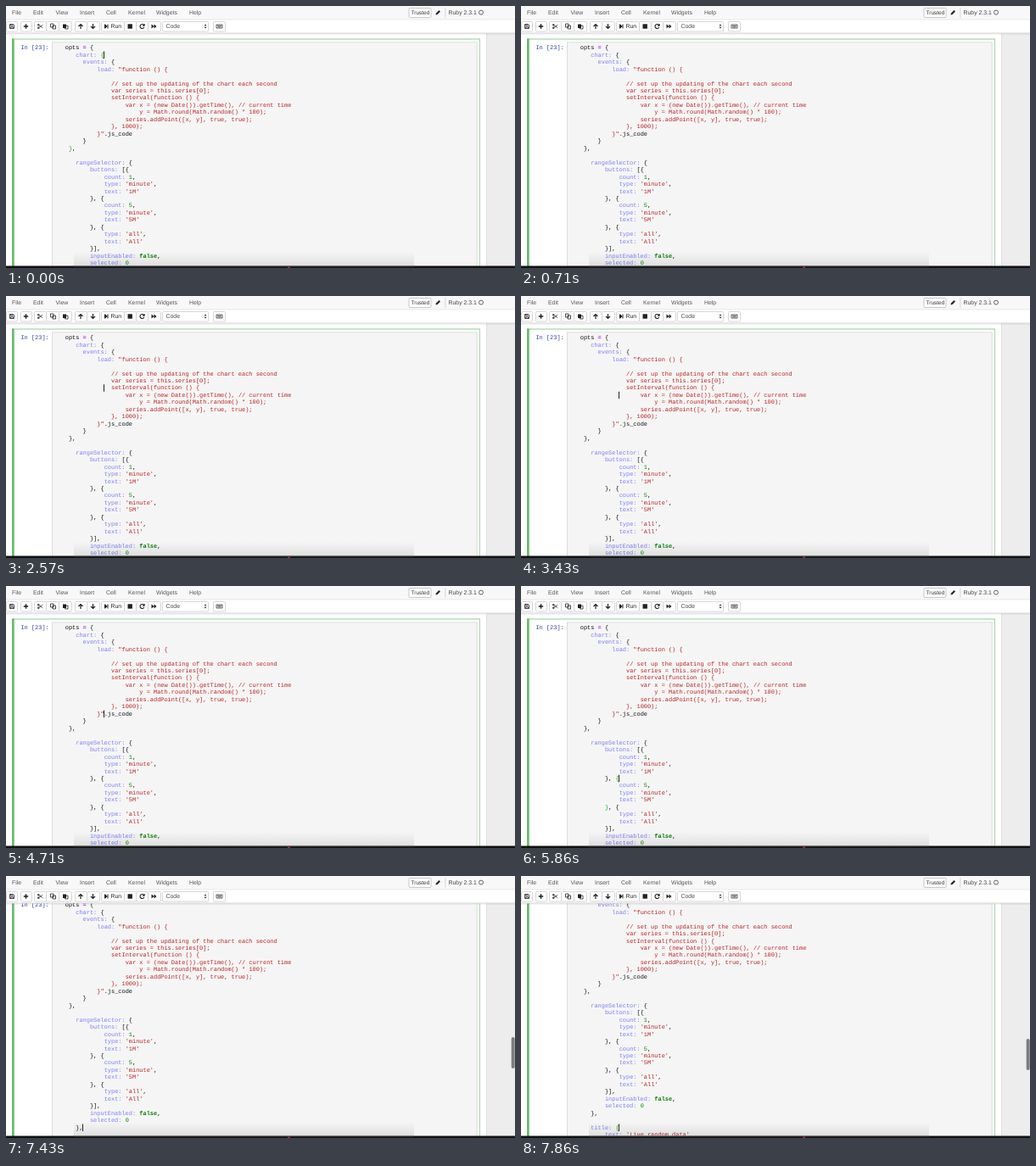
Animation of 600 by 309 pixels, one loop 8 s. Source, as an HTML page with a canvas:

```html
<!DOCTYPE html>
<html lang="en">
<head>
<meta charset="utf-8">
<title>Notebook cell</title>
<style>
html, body { margin: 0; width: 100%; height: 100%; overflow: hidden; background: #fff; }
canvas { display: block; width: 600px; height: 309px; }
</style>
</head>
<body>
<canvas id="stage" width="600" height="309"></canvas>
<script>
const ctx = document.getElementById('stage').getContext('2d');
ctx.textRendering = 'geometricPrecision';

const LOOP = 8000;
const MONO = '6.95px "Liberation Mono", monospace';
const MONO_BOLD = 'bold ' + MONO;
const SANS = '6.9px "Liberation Sans", Arial, sans-serif';
const LEFT = 65.6, TOP = 49, CHAR = 4.17, LINE = 8.467;
const GOAL_COLUMN = 12;

const code = ` opts = {
    chart: {
      events: {
          load: "function () {

              // set up the updating of the chart each second
              var series = this.series[0];
              setInterval(function () {
                  var x = (new Date()).getTime(), // current time
                      y = Math.round(Math.random() * 100);
                  series.addPoint([x, y], true, true);
              }, 1000);
          }".js_code
      }
  },

    rangeSelector: {
        buttons: [{
            count: 1,
            type: 'minute',
            text: '1M'
        }, {
            count: 5,
            type: 'minute',
            text: '5M'
        }, {
            type: 'all',
            text: 'All'
        }],
        inputEnabled: false,
        selected: 0
    },

    title: {
        text: 'Live random data'
    },`;
const lines = code.split('\n');

// Matching bracket cells [row, column], keyed by cursor row
const bracketPairs = {
  1: [[1, 11], [14, 2]],
  13: [[13, 6], [2, 14]],
  21: [[21, 11], [25, 8]],
  25: [[25, 11], [28, 8]],
  33: [[33, 11], [35, 4]]
};

// Cursor moves as [time, row]; a held key covers rows 12 to 29
const moves = [[0, 1], [140, 2], [1000, 3], [1290, 4], [1430, 5], [2290, 6], [2430, 7],
  [3290, 8], [3500, 9], [3750, 10], [4430, 11]];
for (let row = 12; row < 30; row++) moves.push([4710 + (row - 12) * 126, row]);
moves.push([7140, 30], [7430, 31], [7570, 32], [7710, 33]);

const columnX = column => LEFT + column * CHAR;
const rowY = row => TOP + row * LINE;

function rect(x, y, w, h, color) {
  ctx.fillStyle = color;
  ctx.fillRect(x, y, w, h);
}

function text(string, x, y, color, font) {
  ctx.font = font;
  ctx.fillStyle = color;
  ctx.textBaseline = 'alphabetic';
  ctx.fillText(string, x, y + 2.2);
}

function box(x, y, w, h, fill, stroke, radius = 1) {
  ctx.beginPath();
  ctx.roundRect(x + .5, y + .5, w - 1, h - 1, radius);
  ctx.fillStyle = fill;
  ctx.fill();
  ctx.strokeStyle = stroke;
  ctx.lineWidth = .8;
  ctx.stroke();
}

function path(d, x, y, fill, width = 1) {
  ctx.save();
  ctx.translate(x, y);
  const shape = new Path2D(d);
  ctx.lineWidth = width;
  ctx.fillStyle = ctx.strokeStyle = '#222';
  if (fill) ctx.fill(shape); else ctx.stroke(shape);
  ctx.restore();
}

function tokenStyle(token) {
  if (/^["']/.test(token)) return ['#ba2121', MONO];
  if (/^\w+:$/.test(token)) return ['#7c7cf8', MONO];
  if (token === 'false') return ['#008000', MONO_BOLD];
  if (token === '=') return ['#aa22ff', MONO_BOLD];
  if (/^\d/.test(token)) return ['#008800', MONO];
  return ['#111', MONO];
}

function tokenize() {
  const runs = [];
  let row = 0, column = 0;
  for (const [token] of code.matchAll(/"[^"]*"|'[^']*'|\w+:|\w+|=|[^\w\s"'=]+|\s+/g)) {
    const [color, font] = tokenStyle(token);
    token.split('\n').forEach((part, i) => {
      if (i) { row++; column = 0; }
      const indent = part.length - part.trimStart().length;
      if (part.trim()) runs.push({ part: part.trim(), row, column: column + indent, color, font });
      column += part.length;
    });
  }
  return runs;
}
const runs = tokenize();

function drawCell(row, scroll, cursorOn) {
  ctx.save();
  ctx.beginPath();
  ctx.rect(0, 32, 600, 277);
  ctx.clip();
  rect(0, 32, 600, 277, '#ededed');
  rect(0, 32, 566, 277, '#fff');
  rect(566, 32, 1, 277, '#dfdfdf');

  ctx.translate(0, -scroll);
  rect(7, 38.5, 552, 1, '#8fcb92');
  rect(558, 39, 1, 330, '#a6d5a8');
  rect(7, 38.5, 2.7, 330, '#66bb6a');
  rect(54, 42.5, 501.5, 330, '#d2d2d2');
  rect(54.7, 43.2, 500, 330, '#f5f5f5');
  text('In [23]:', 17.4, TOP, '#303f9f', MONO);

  for (const run of runs) text(run.part, columnX(run.column), rowY(run.row), run.color, run.font);
  for (const [r, c] of bracketPairs[row] || []) {
    rect(columnX(c), rowY(r) - 4, CHAR, 8, '#f5f5f5');
    text(lines[r][c], columnX(c), rowY(r), '#00bb00', MONO);
  }
  if (cursorOn) {
    const column = Math.min(GOAL_COLUMN, lines[row].length);
    rect(Math.floor(columnX(column)), rowY(row) - 4, 1, 8.5, '#222');
  }
  ctx.restore();
}

function drawMenu() {
  rect(0, 0, 600, 32, '#fff');
  rect(0, 0, 600, 15.5, '#f8f8f8');
  rect(0, 15.5, 600, .8, '#e2e2e2');
  rect(0, 31.5, 600, 1, '#d6d6d6');
  rect(0, 32.5, 600, 1.5, 'rgba(0,0,0,.05)');
  const labels = { File: 7, Edit: 32, View: 58.5, Insert: 87, Cell: 118, Kernel: 144, Widgets: 177, Help: 216 };
  for (const name in labels) text(name, labels[name], 7.7, '#555', SANS);

  box(474.5, 2, 27, 12, '#fff', '#bbb');
  text('Trusted', 477.5, 8, '#333', '6.5px "Liberation Sans", Arial, sans-serif');
  path('M-2.5 3 L-2 1 L1.5 -2.5 L3 -1 L-.5 2.5 Z', 509, 7.5, true);
  rect(517.5, 2, .8, 12, '#d0d0d0');
  text('Ruby 2.3.1', 521.5, 7.7, '#444', SANS);
  ctx.beginPath();
  ctx.arc(560, 7.6, 2.5, 0, Math.PI * 2);
  ctx.strokeStyle = '#555';
  ctx.lineWidth = .9;
  ctx.stroke();
}

function drawToolbar() {
  const groups = [[0, 14], [17, 14], [33, 15], [47, 16], [62, 16], [81, 15], [95, 16],
    [112, 28], [139, 15], [153, 15], [167, 16], [184, 55], [244, 15]];
  for (const [x, w] of groups) box(x, 18, w, 12.5, '#fff', '#ccc');
  const y = 24;

  path('M-2.5 -2.5 H1.5 L2.5 -1.5 V2.5 H-2.5 Z M-1.3 -2.5 V-.8 H1 V-2.5 M-1.3 2.5 V.8 H1.3 V2.5', 7, y, false, .8);
  path('M-2.7 0 H2.7 M0 -2.7 V2.7', 23.5, y, false, 1.5);
  path('M-2.3 -1.8 L2.8 1.8 M-2.3 1.8 L2.8 -1.8 M-3 -2.5 h1.5 v1.5 h-1.5 Z M-3 1 h1.5 v1.5 h-1.5 Z', 40.5, y, false, .7);
  path('M-3 -3 H.5 V1 H-3 Z M-.5 -1 H3 V3 H-.5 Z', 55.5, y, false, .8);
  path('M-3 -2.5 H1 V2 H-3 Z', 70, y, true);
  path('M-.5 -.8 H3 V3 H-.5 Z', 70, y, false, .8);
  path('M0 3 V-2.3 M-2.5 0 L0 -2.5 L2.5 0', 88, y, false, 1.2);
  path('M0 -3 V2.3 M-2.5 0 L0 2.5 L2.5 0', 102.5, y, false, 1.2);
  path('M-2.5 -2.5 H-1.5 V2.5 H-2.5 Z M-1.5 -2.5 L1 0 L-1.5 2.5 Z M1 -2.5 H2 V2.5 H1 Z', 118.5, y, true);
  text('Run', 123.5, y + .2, '#222', SANS);
  rect(143.5, 21.3, 5.4, 5.4, '#222');
  path('M2.2 -1.2 A2.5 2.5 0 1 0 2.3 1 M2.6 -3 V-.8 H.4', 160.5, y, false, 1.1);
  path('M-3 -2.6 L0 0 L-3 2.6 Z M0 -2.6 L3 0 L0 2.6 Z', 174.5, y, true);
  text('Code', 188.5, y + .2, '#444', SANS);
  path('M-1.5 -.7 L0 -2.5 L1.5 -.7 Z M-1.5 .7 L0 2.5 L1.5 .7 Z', 235, y, true);
  path('M-3.5 -2 H3.5 V2 H-3.5 Z M-2.5 -.6 H2.5 M-2 .9 H2', 251.5, y, false, .7);
}

function drawDock() {
  const shade = ctx.createLinearGradient(0, 290, 0, 307);
  shade.addColorStop(0, 'rgba(0,0,0,0)');
  shade.addColorStop(1, 'rgba(0,0,0,.09)');
  rect(80, 290, 401, 17, shade);
  rect(0, 306.5, 600, 2.5, '#111');
  rect(80, 306, 401, 1.2, '#777');
  rect(332, 307.5, 3, 1.5, '#9c3030');
}

function draw(time) {
  const [movedAt, row] = moves.findLast(move => move[0] <= time);
  const cursorOn = (time - movedAt) % 1060 < 530;
  const scroll = Math.max(0, 15 + (row - 31) * LINE);

  drawCell(row, scroll, cursorOn);
  drawMenu();
  drawToolbar();
  if (scroll) {
    ctx.beginPath();
    ctx.roundRect(595.7, 190 + (scroll - 15) * .12, 4, 37, 2);
    ctx.fillStyle = '#7d7d7d';
    ctx.fill();
  }
  drawDock();
}

const start = performance.now();
function tick() {
  draw((performance.now() - start) % LOOP);
  requestAnimationFrame(tick);
}
tick();
</script>
</body>
</html>
```
